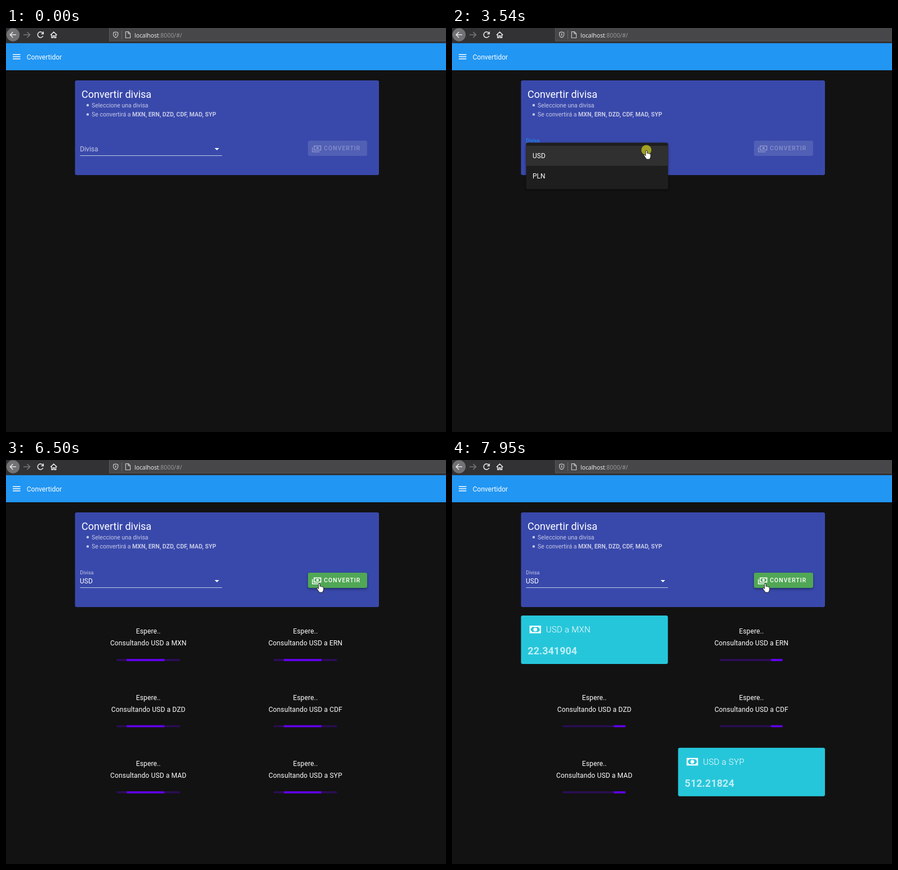
An HTML page that plays this animation: 781x717 px, repeating every 8 s.

```html
<!DOCTYPE html>
<html lang="es">
<head>
<meta charset="utf-8">
<title>Convertidor</title>
<style>
  html, body { margin: 0; width: 100%; height: 100%; overflow: hidden; background: #121212; }
  svg { display: block; width: 781px; height: 717px; font-family: Roboto, Arial, sans-serif; }
  text { white-space: pre; }
  .soft { fill: #c4c8e6; font-size: 10.5px; }
  .body { fill: #fff; font-size: 12px; }
  .wait { letter-spacing: .14px; text-anchor: middle; }
  .nav { fill: none; stroke: #e4e4e6; stroke-width: 1.6; }
  .url { font: 10.4px "Open Sans", "Noto Sans", sans-serif; fill: #9c9c9f; }
  .raised { filter: drop-shadow(0 2px 2px rgba(0, 0, 0, .4)); }
</style>
</head>
<body>
<svg id="stage" viewBox="0 0 781 717">
  <defs>
    <clipPath id="track"><rect width="113" height="4" rx="2"/></clipPath>
    <path id="cash" fill-rule="evenodd" d="M3 6H21V18H3ZM12 9a3 3 0 0 1 0 6a3 3 0 0 1 0-6M7 8a2 2 0 0 1-2 2v4a2 2 0 0 1 2 2h10a2 2 0 0 1 2-2v-4a2 2 0 0 1-2-2z"/>
  </defs>
  <rect width="781" height="717" fill="#121212"/>

  <rect width="781" height="27" fill="#323234"/>
  <rect x="183.5" y="-2" width="610" height="25" fill="#474749" stroke="#58585b"/>
  <circle cx="12.5" cy="12" r="11.7" fill="#727275"/>
  <g class="nav">
    <path d="M18 12H7.5M12.3 7L7.3 12l5 5"/>
    <path stroke="#77777a" d="M31 12h11M37.500 7l5 5l-5 5"/>
    <path d="M65.500 9.300A5 5 0 1 0 65.800 14M66.300 6.500v4h-4"/>
    <path d="M79 12.500L84.700 7l5.700 5.500M81 11.500v5.800h2.500v-3.500h2.500v3.500h2.500v-5.800"/>
    <g stroke="#c8c8ca" stroke-width="1.2">
      <path d="M194.700 7l4 1.200v3.500c0 2.500-1.800 4.200-4 5.300c-2.200-1.100-4-2.800-4-5.300V8.200z"/>
      <path stroke-width="1.600" d="M194.700 9.500v4"/>
      <path stroke="#68686b" stroke-width="1" d="M205.500 4v16"/>
      <path d="M212.300 6.600h5l3.300 3.300v7.600h-8.300zM217 6.800v3.400h3.400"/>
    </g>
  </g>
  <text class="url" x="228" y="16.500"><tspan fill="#f5f5f7">localhost</tspan>:8000/#/</text>

  <rect y="27" width="781" height="48" fill="#2196f3"/>
  <path transform="translate(9.750 42) scale(.75)" fill="#fff" d="M3 6h18v2H3zM3 11h18v2H3zM3 16h18v2H3z"/>
  <text class="body" x="36.800" y="55.700">Convertidor</text>

  <rect x="122.500" y="93" width="539.500" height="168" rx="3" fill="#3949ab"/>
  <text x="134" y="123.500" font-size="18" fill="#fff">Convertir divisa</text>
  <g class="soft">
    <circle cx="145" cy="137" r="2.200"/><circle cx="145" cy="153.400" r="2.200"/>
    <text x="152" y="140.500">Seleccione una divisa</text>
    <text x="152" y="157">Se convertirá a <tspan font-weight="700">MXN, ERN, DZD, CDF, MAD, SYP</tspan></text>
  </g>

  <path fill="#c4c8e6" d="M131.500 226h252v1h-252z"/>
  <rect id="line" y="225.500" height="1.500"/>
  <text id="label" font-size="12">Divisa</text>
  <text id="value" class="body" x="131" y="219">USD</text>
  <path fill="#fff" d="M370.300 213h8l-4 4z"/>

  <g id="button">
    <rect id="face" x="536" y="200" width="105" height="27" rx="3"/>
    <rect id="flash" x="536" y="200" width="105" height="27" rx="3" fill="#fff"/>
    <g id="caption">
      <path transform="translate(542.400 204) scale(.75)" fill-rule="evenodd" d="M5 6H23V18H5ZM14 9a3 3 0 0 1 0 6a3 3 0 0 1 0-6M9 8a2 2 0 0 1-2 2v4a2 2 0 0 1 2 2h10a2 2 0 0 1 2-2v-4a2 2 0 0 1-2-2zM1 10H3V20H19V22H1z"/>
      <text x="564.300" y="217" font-size="10.500" font-weight="500" letter-spacing=".94">CONVERTIR</text>
    </g>
  </g>

  <g id="results"></g>

  <g id="menu" class="raised">
    <rect x="131.500" y="203.500" width="252" height="82.500" rx="3" fill="#1e1e1e"/>
    <rect x="131.500" y="209" width="252" height="35.500" fill="#303030"/>
    <g id="items" class="body">
      <text x="143" y="231">USD</text><text x="143" y="266.700">PLN</text>
    </g>
  </g>

  <circle id="press" r="9" fill="#ffff1e" fill-opacity=".55"/>
  <g id="cursor">
    <path id="arrow" fill="#fff" stroke="#111" stroke-width=".9" d="M0 0V12.500L2.800 10L4.700 14.500L6.700 13.600L4.800 9.200H8.700Z"/>
    <path id="hand" fill="#fff" stroke="#111" stroke-width=".9" d="M-1.300 1Q0-.8 1.300 1V5.300Q2.600 4.400 3.600 5.800Q4.900 5 5.800 6.300Q7.600 5.900 7.800 7.800V11Q7.600 13 6.400 14V16H-.5V14.400Q-2.400 12.500-4.400 9Q-4.800 7.300-3 7.700L-1.300 9.500Z"/>
  </g>
</svg>
<script>
const LOOP = 8000;
const OPEN = 2920, PICK = 3540, CLOSE = 3610, CLICK = 4896;
const SPIN = 2200;
const BLUE = [33, 150, 243], WHITE = [255, 255, 255], GRAY = [196, 200, 230];
const OFF = [81, 95, 181], GREEN = [76, 175, 80], HOVER = [80, 167, 85];

// time, x, y of the pointer tip; each place holds until the next
const PATH = [
  [440, 773, 713], [510, 764, 709], [990, 706, 667], [1060, 657, 630],
  [1290, 520, 510], [1370, 280, 278], [1450, 166, 190],
  [1680, 158, 186], [1750, 146, 177], [1830, 138, 172],
  [2160, 160, 170], [2230, 260, 172], [2300, 380, 180], [2370, 421, 190], [2450, 360, 199],
  [2600, 354, 206], [2680, 347, 213], [2750, 345, 217],
  [3860, 352, 218], [3940, 392, 222], [4020, 452, 226], [4100, 510, 226],
  [4180, 542, 223], [4260, 553, 220], [4330, 556, 219]
];
const PRESSES = [[OPEN, 150], [PICK, 150], [CLICK - 20, 150]];

const CELLS = [
  { code: 'MXN', rate: '22.341904', at: 7660 }, { code: 'ERN' },
  { code: 'DZD' }, { code: 'CDF' },
  { code: 'MAD' }, { code: 'SYP', rate: '512.21824', at: 6708 }
];

const el = id => document.getElementById(id);
const lerp = (a, b, k) => a + (b - a) * k;
const clamp = (v, a = 0, b = 1) => Math.min(b, Math.max(a, v));
const mix = (a, b, k) => `rgb(${a.map((v, i) => Math.round(lerp(v, b[i], k)))})`;

function bezier(x1, y1, x2, y2) {
  const at = (a, b, s) => 3 * (1 - s) ** 2 * s * a + 3 * (1 - s) * s * s * b + s ** 3;
  return x => {
    if (x <= 0) return 0;
    if (x >= 1) return 1;
    let lo = 0, hi = 1;
    for (let i = 0; i < 24; i++) {
      const mid = (lo + hi) / 2;
      if (at(x1, x2, mid) < x) lo = mid; else hi = mid;
    }
    return at(y1, y2, lo);
  };
}
const ease = bezier(.25, .1, .25, 1);
const swing = bezier(.25, .8, .5, 1);
const ramp = (t, start, length = 300) => swing((t - start) / length);

function set(node, attrs) {
  for (const key in attrs) node.setAttribute(key, attrs[key]);
}
const show = (node, on) => set(node, { visibility: on ? 'visible' : 'hidden' });

el('results').innerHTML = CELLS.map((cell, i) => {
  const x = i % 2 * 278.8, y = Math.floor(i / 2) * 117.4;
  const card = cell.rate ? `
    <g class="card">
      <rect x="122.500" y="276" width="260.700" height="86" rx="3" fill="#26c6da"/>
      <use href="#cash" transform="translate(134.300 287.300) scale(1.125)" fill="#fff"/>
      <text x="166.800" y="306.300" font-size="15" font-weight="300" letter-spacing=".25" fill="#fff">USD a ${cell.code}</text>
      <text x="134.300" y="345" font-size="18" font-weight="700" fill="#fff" fill-opacity=".7">${cell.rate}</text>
    </g>` : '';
  return `<g transform="translate(${x} ${y})">
    <g class="pending">
      <text class="body wait" x="252.700" y="308.300">Espere..</text>
      <text class="body wait" x="252.700" y="329.200">Consultando USD a ${cell.code}</text>
      <g transform="translate(196 353)" clip-path="url(#track)" fill="#6200ea">
        <rect width="113" height="4" fill-opacity=".3"/>
        <rect class="bar" height="4"/>
      </g>
    </g>${card}</g>`;
}).join('');
[...el('results').children].forEach((node, i) => {
  CELLS[i].pending = node.querySelector('.pending');
  CELLS[i].bar = node.querySelector('.bar');
  CELLS[i].card = node.querySelector('.card');
});

// left and right ends of the running bar, as parts of the track
function barSpan(t) {
  const p = (t - CLICK) % SPIN / SPIN;
  if (p < .6) {
    const k = ease(p / .6);
    return [lerp(-2, 1.07, k), lerp(0, 1.08, k)];
  }
  const k = ease((p - .6) / .4);
  return [lerp(-.9, 1, k), lerp(0, 1.35, k)];
}

function drawField(t) {
  const up = ramp(t, OPEN), blur = ramp(t, CLICK + 20);
  set(el('label'), {
    transform: `translate(131.3 ${lerp(219, 203, up)}) scale(${lerp(1, .75, up)})`,
    fill: t < CLICK ? mix(GRAY, BLUE, up) : mix(BLUE, GRAY, blur)
  });
  const width = 252 * up * (1 - blur);
  set(el('line'), { x: 257.5 - width / 2, width, fill: t < CLICK + 20 ? mix(BLUE, BLUE, 0) : mix(WHITE, WHITE, 0) });
  show(el('value'), t >= CLOSE);
}

function drawMenu(t) {
  const open = ramp(t, OPEN + 40) * (1 - ramp(t, CLOSE));
  show(el('menu'), open > 0);
  set(el('menu'), { opacity: open });
  set(el('items'), { opacity: ramp(t, OPEN + 120, 250) });
}

function drawButton(t) {
  const on = ramp(t, CLOSE, 280), hover = ramp(t, 4180, 280);
  set(el('face'), { fill: hover > 0 ? mix(GREEN, HOVER, hover) : mix(OFF, GREEN, on) });
  set(el('caption'), { fill: '#fff', 'fill-opacity': lerp(.3, 1, on) });
  set(el('flash'), { opacity: t < CLICK ? 0 : .1 * ramp(t, CLICK, 150) * (1 - clamp((t - 5120) / 300)) });
  el('button').setAttribute('class', on > 0 ? 'raised' : '');
}

function drawResults(t) {
  const [a, b] = barSpan(Math.max(t, CLICK)).map(v => clamp(v) * 113);
  for (const { pending, bar, card, at = Infinity } of CELLS) {
    show(pending, t >= CLICK && t < at);
    set(bar, { x: a, width: Math.max(0, b - a) });
    if (!card) continue;
    const k = ramp(t, at);
    show(card, t >= at);
    set(card, { opacity: k, transform: `translate(${15 * (1 - k)} 0)` });
  }
}

function drawPointer(t) {
  const step = PATH.findLast(p => p[0] <= t);
  show(el('cursor'), step);
  const pressed = step && PRESSES.some(([at, length]) => t >= at && t < at + length);
  show(el('press'), pressed);
  if (!step) {
    el('arrow').style.display = el('hand').style.display = 'none';
    return;
  }
  const [, x, y] = step;
  const hand = t >= 2600 && (x < 384 || x > 536);
  el('arrow').style.display = hand ? 'none' : '';
  el('hand').style.display = hand ? '' : 'none';
  set(el('cursor'), { transform: `translate(${x} ${y})` });
  set(el('press'), { cx: x, cy: y - .5 });
}

function frame() {
  const t = performance.now() % LOOP;
  drawField(t);
  drawMenu(t);
  drawButton(t);
  drawResults(t);
  drawPointer(t);
  requestAnimationFrame(frame);
}
frame();
</script>
</body>
</html>
```
